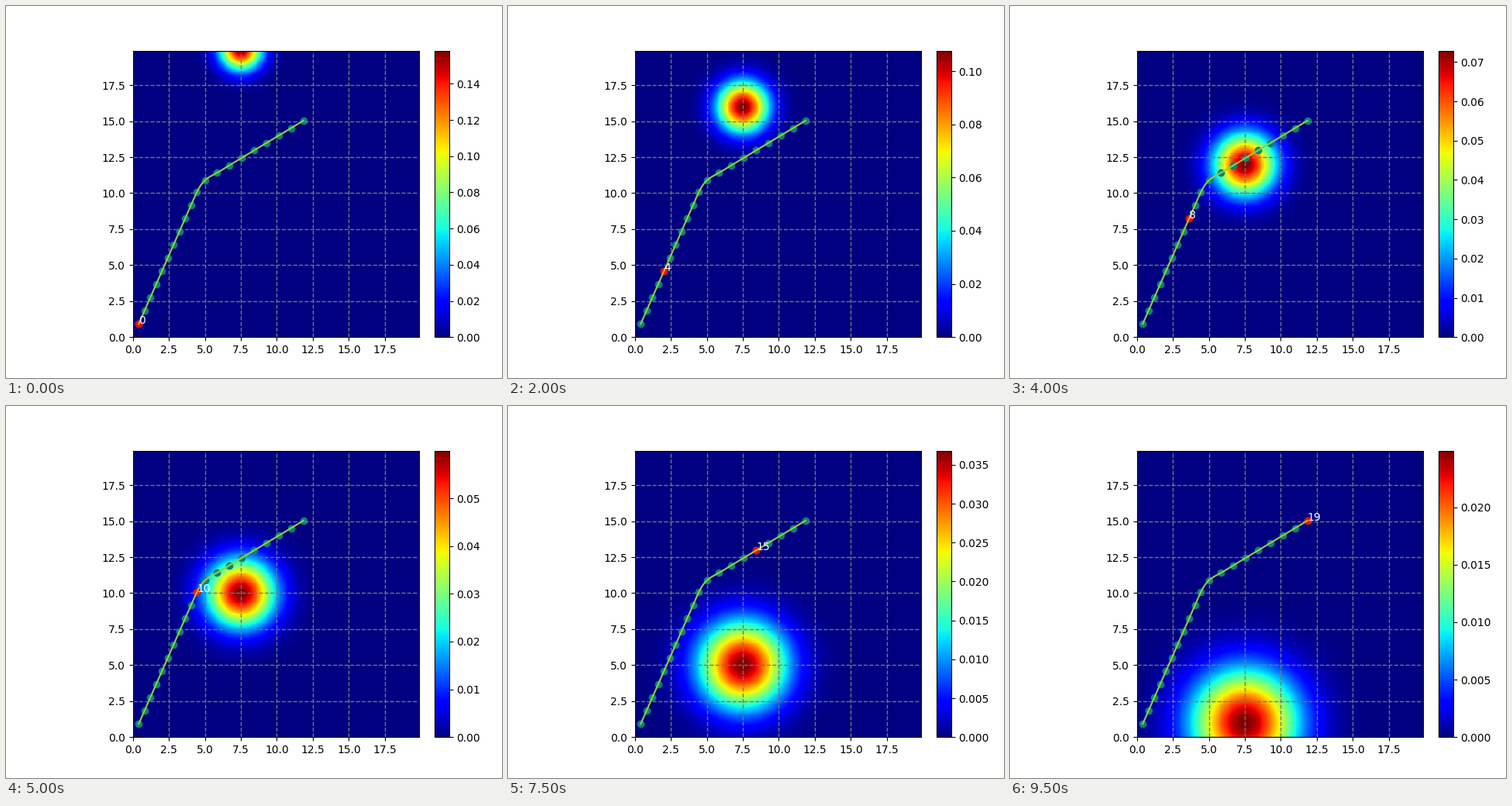
A matplotlib script for the animation above (10000 ms loop, 640x480 px).

```python
import numpy as np
import matplotlib.pyplot as plt
from matplotlib.animation import FuncAnimation

STEPS = 20
INTERVAL = 500


def walk_path():
    """Unit steps from the origin: steep leg, short turn, shallow leg."""
    headings = np.radians([66.2] * 11 + [55.6, 32.0] + [31.1] * 7)
    return np.cumsum(np.column_stack([np.cos(headings), np.sin(headings)]), axis=0)


def natural_spline(points, per_segment=20):
    """Natural cubic spline through evenly parametrised points."""
    n = len(points)
    system = np.eye(n)
    rhs = np.zeros_like(points)
    for k in range(1, n - 1):
        system[k, k - 1:k + 2] = 1, 4, 1
        rhs[k] = 6 * (points[k - 1] - 2 * points[k] + points[k + 1])
    curvature = np.linalg.solve(system, rhs)

    t = np.linspace(0, n - 1, (n - 1) * per_segment + 1)
    k = np.minimum(t.astype(int), n - 2)
    b = (t - k)[:, None]
    a = 1 - b
    return (a * points[k] + b * points[k + 1]
            + ((a**3 - a) * curvature[k] + (b**3 - b) * curvature[k + 1]) / 6)


def density(step):
    """Gaussian drifting down one unit per step, widening by 5 %."""
    sigma = 1.05**step
    r2 = (grid_x - 7.5)**2 + (grid_y - (20 - step))**2
    return np.exp(-r2 / (2 * sigma**2)) / (2 * np.pi * sigma**2)


axis = np.arange(200) / 10
grid_x, grid_y = np.meshgrid(axis, axis)
path = walk_path()

fig, ax = plt.subplots(figsize=(6.4, 4.8), dpi=100)
field = ax.pcolormesh(grid_x, grid_y, density(0), cmap="jet", shading="nearest")
ax.set_aspect("equal")
ax.grid(color="#767676", linestyle="--", linewidth=1)
fig.colorbar(field, ax=ax, fraction=0.046, pad=0.04)

ax.scatter(*path.T, color="#088379")
current = ax.scatter(*path[0], color="red")
ax.plot(*natural_spline(path).T, color="yellowgreen")
label = ax.text(*path[0], "0", color="white")
ax.set(xlim=(0, axis[-1]), ylim=(0, axis[-1]))


def update(step):
    z = density(step)
    field.set_array(z)
    field.set_clim(z.min(), z.max())
    current.set_offsets(path[step:step + 1])
    label.set_position(path[step])
    label.set_text(str(step))
    return field, current, label


animation = FuncAnimation(fig, update, frames=STEPS, interval=INTERVAL,
                          repeat=True, repeat_delay=0, blit=False)
plt.show()
```
